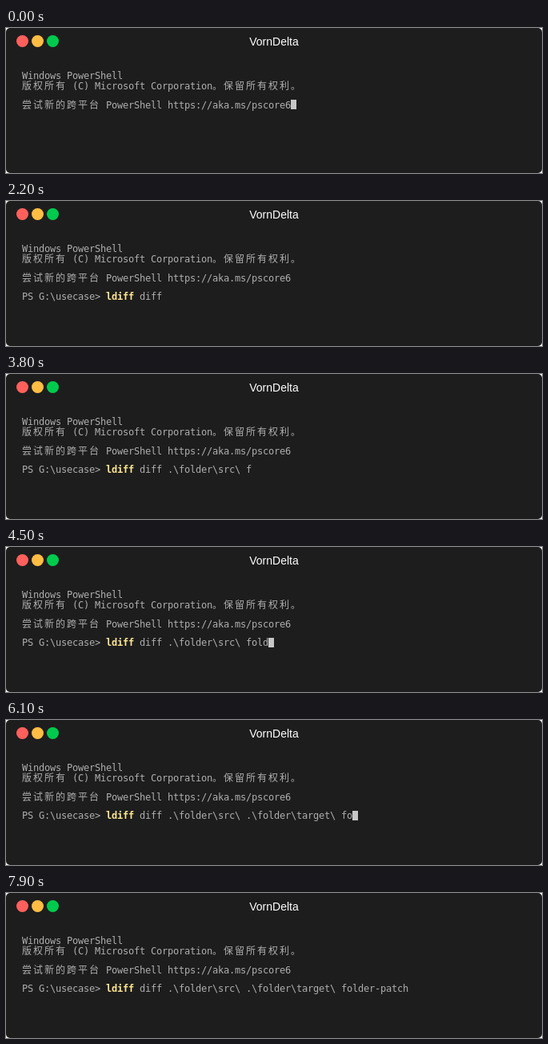
An HTML page for the animation above (8000 ms loop, 670x182 px).

```html
<!DOCTYPE html>
<html lang="zh-CN">
<head>
<meta charset="utf-8">
<title>VornDelta</title>
<style>
  html, body { margin: 0; width: 100%; height: 100%; overflow: hidden; background: #fff; }
  .window {
    position: absolute; inset: 0; border-radius: 5px;
    background: #1d1d1d; color: #afafaf; overflow: hidden;
  }
  .dot { position: absolute; top: 9px; width: 15px; height: 15px; border-radius: 50%; }
  .close { left: 13px; background: #ff605c; }
  .minimize { left: 32px; background: #ffbd44; }
  .maximize { left: 51px; background: #00ca4e; }
  .title {
    position: absolute; top: 9px; width: 100%; text-align: center; color: #fff;
    font: 14px/16px "Liberation Sans", Arial, sans-serif;
  }
  .screen {
    position: absolute; left: 20px; top: 54px;
    font: 12px/12px "DejaVu Sans Mono", "Noto Sans CJK SC", monospace;
    font-variant-ligatures: none;
  }
  .row { height: 12px; white-space: pre; }
  .wide { font-family: "Noto Sans CJK SC", "Noto Sans CJK", sans-serif; letter-spacing: 2px; }
  .command { color: #ffe792; font-weight: bold; }
  .cursor { position: absolute; width: 7px; height: 12px; background: #c7c7c7; }
</style>
</head>
<body>
<div class="window">
  <div class="dot close"></div>
  <div class="dot minimize"></div>
  <div class="dot maximize"></div>
  <div class="title">VornDelta</div>
  <div class="screen" id="screen">
    <div class="row">Windows PowerShell</div>
    <div class="row"><span class="wide">版权所有</span> (C) Microsoft Corporation<span class="wide">。保留所有权利。</span></div>
    <div class="row"></div>
    <div class="row"><span class="wide">尝试新的跨平台</span> PowerShell https://aka.ms/pscore6</div>
    <div class="row"></div>
    <div class="row" id="prompt">PS G:\usecase&gt; <span class="command" id="command"></span><span id="args"></span></div>
    <div class="cursor" id="cursor"></div>
  </div>
</div>
<script>
const CELL = 7, LINE = 12, STEP = 100;
const PROMPT_COLS = 15;
const KEYS = 'ldiff diff fo\tsr\t folder\tt\t folder-patch';
const COMPLETIONS = {
  'fo': '.\\folder\\',
  'folder': '.\\folder\\',
  '.\\folder\\sr': '.\\folder\\src\\',
  '.\\folder\\t': '.\\folder\\target\\'
};
const el = id => document.getElementById(id);
const screenBox = el('screen'), promptRow = el('prompt');
const command = el('command'), args = el('args'), cursor = el('cursor');

// Snap the monospaced advance to whole terminal cells.
function fitCells() {
  const probe = document.createElement('span');
  probe.style.cssText = 'position:absolute;visibility:hidden;white-space:pre';
  probe.textContent = 'm'.repeat(100);
  screenBox.append(probe);
  const advance = probe.getBoundingClientRect().width / 100;
  probe.remove();
  screenBox.style.letterSpacing = (CELL - advance) + 'px';
}

function press(line, key) {
  if (key !== '\t') return line + key;
  const start = line.lastIndexOf(' ') + 1;
  return line.slice(0, start) + COMPLETIONS[line.slice(start)];
}

// Each key redraws the line with the cursor hidden, then shows it again.
function buildStates() {
  const states = [{ line: null, shown: true }, { line: '', shown: true }];
  let line = '';
  [...KEYS].forEach((key, i) => {
    line = press(line, key);
    states.push({ line, shown: false });
    if (i < KEYS.length - 2) states.push({ line, shown: true });
  });
  return states;
}

const states = buildStates();
let current = -1;

function render(index) {
  const { line, shown } = states[index];
  const ready = line !== null;
  const [name] = (line || '').split(' ');
  promptRow.style.visibility = ready ? 'visible' : 'hidden';
  command.textContent = name;
  args.textContent = (line || '').slice(name.length);
  cursor.style.visibility = shown ? 'visible' : 'hidden';
  cursor.style.left = (ready ? PROMPT_COLS + line.length : 48) * CELL + 'px';
  cursor.style.top = (ready ? 5 : 3) * LINE + 'px';
}

function tick() {
  const index = Math.floor((performance.now() - begin) / STEP) % states.length;
  if (index !== current) render(current = index);
  requestAnimationFrame(tick);
}

fitCells();
const begin = performance.now();
tick();
</script>
</body>
</html>
```
